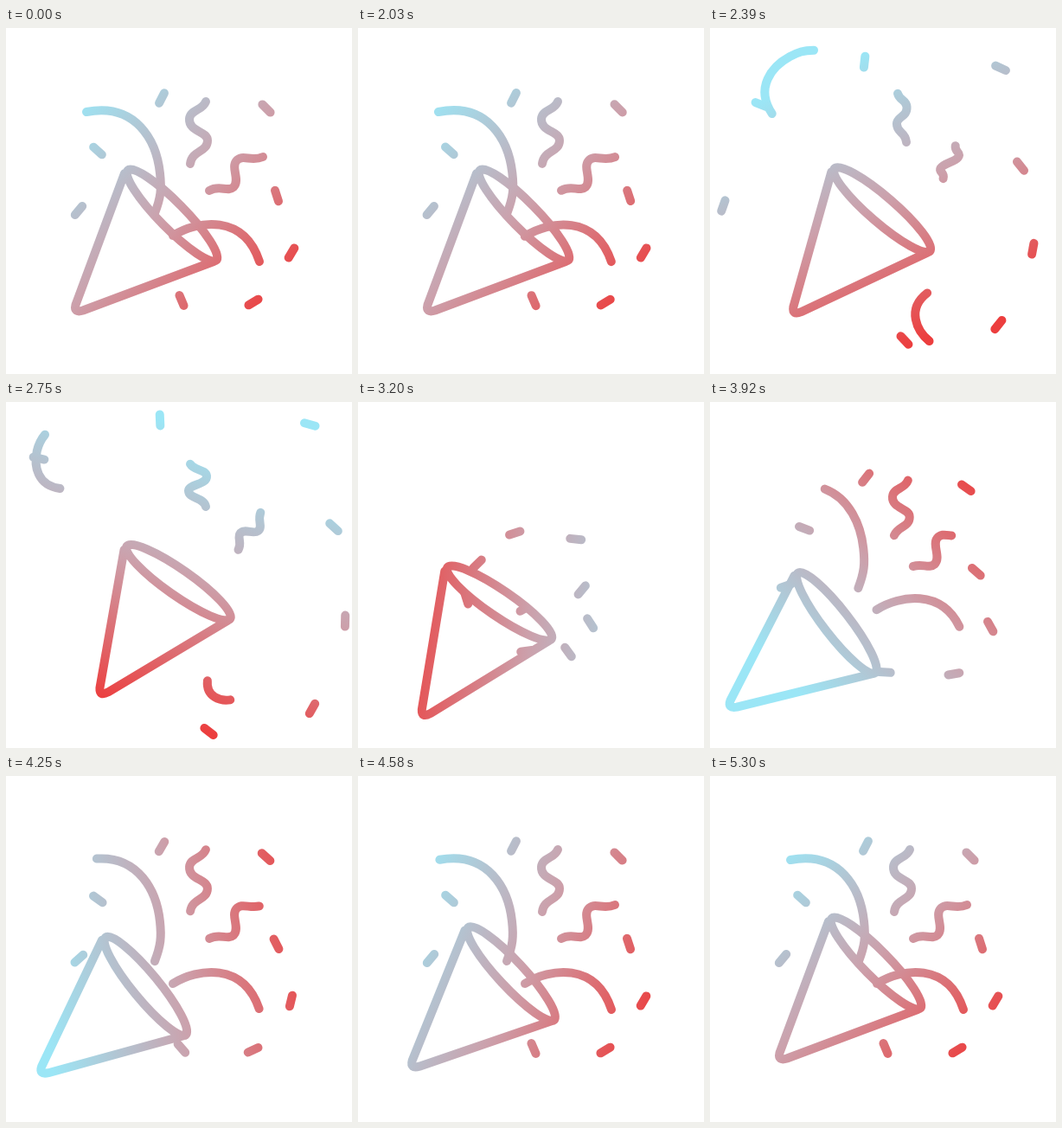
Write an HTML page with a canvas that moves like this. It is 400 px wide and 400 px high and loops after 5360 ms.

```html
<!DOCTYPE html>
<html lang="en">
<head>
<meta charset="utf-8">
<title>Party popper</title>
<style>
  html, body { margin: 0; width: 100%; height: 100%; overflow: hidden; background: #fff; }
  canvas { display: block; width: 400px; height: 400px; }
</style>
</head>
<body>
<canvas id="stage" width="400" height="400"></canvas>
<script>
const ctx = document.getElementById('stage').getContext('2d');
const LOOP = 5360, START = 2030, FIRE = 2770, GONE = 3120, SETTLE = 4527;
const MUZZLE = { x: 183, y: 250 };

// Key poses: time, then values
const conePose = [ // apex x, apex y, rotation
  [START, 83, 326, 0], [2750, 112, 336, -10.4], [3440, 55, 370, -8.7],
  [3900, 25, 352, 6.6], [4580, 65, 335, 1.6], [5300, 83, 326, 0]
];
const gradientAngle = [[START, 45], [2750, 107], [3440, 227], [3920, 315], [4580, 384], [4730, 405]];

// Resting place and tilt, turn left when fired, and the way out
const confetti = [
  { x: 180, y: 81, tilt: 117, spin: 31, dx: -2, dy: -61 },
  { x: 106, y: 142, tilt: 42, spin: -60, dx: -69, dy: -78 },
  { x: 84, y: 211, tilt: 130, spin: 85, dx: -100, dy: -8 },
  { x: 301, y: 93, tilt: 45, spin: -27, dx: 51, dy: -68 },
  { x: 313, y: 194, tilt: 72, spin: -85, dx: 67, dy: -50 },
  { x: 330, y: 260, tilt: 121, spin: -169, dx: 63, dy: -7 },
  { x: 286, y: 317, tilt: 149, spin: 59, dx: 69, dy: 38 },
  { x: 203, y: 315, tilt: 67, spin: -177, dx: 32, dy: 67 }
];

function curve(d) {
  const el = document.createElementNS('http://www.w3.org/2000/svg', 'path');
  el.setAttribute('d', d);
  return { path: new Path2D(d), length: el.getTotalLength() };
}
const leftStreamer = curve('M172 214C179 196 180 186 178 168C174 130 150 86 93 97');
const rightStreamer = curve('M193 240C222 222 275 215 293 270');
const tallSquiggle = curve('M213 157C215 141 233 144 233 130C233 119 211 120 212 105C213 94 227 96 231 85');
const wideSquiggle = curve('M235 188C247 181 256 190 263 184C271 176 260 162 266 154C273 145 283 155 297 149');

const cone = new Path2D('M137 168L80.500 320Q78 330 89 326.500L240 270');
cone.ellipse(192, 216.500, 73, 15, Math.PI * .2525, 0, Math.PI * 2);

const bit = new Path2D('M-6.500 0H6.500');

const clamp = v => Math.min(1, Math.max(0, v));
const mix = (a, b, k) => a + (b - a) * k;
const easeOut = (t, start, duration, power) => 1 - (1 - clamp((t - start) / duration)) ** power;

// Smooth curve through keys, at rest at both ends.
function track(keys, t) {
  const last = keys.length - 1;
  if (t <= keys[0][0]) return keys[0].slice(1);
  if (t >= keys[last][0]) return keys[last].slice(1);
  const i = keys.findIndex(k => k[0] > t) - 1;
  const a = keys[i], b = keys[i + 1], span = b[0] - a[0], u = (t - a[0]) / span;
  const slope = (n, c) => n === 0 || n === last ? 0 :
    (keys[n + 1][c] - keys[n - 1][c]) / (keys[n + 1][0] - keys[n - 1][0]);
  return a.slice(1).map((v, j) => {
    const c = j + 1, e = u * u * (3 - 2 * u);
    return mix(v, b[c], e) +
      span * u * (1 - u) * ((1 - u) * slope(i, c) - u * slope(i + 1, c));
  });
}

// Strokes a path with its anchor moved by (dx, dy); the line weight stays constant.
function stroke(path, ax, ay, dx, dy, turn = 0, sx = 1, sy = sx) {
  const moved = new Path2D();
  moved.addPath(path, new DOMMatrix().translate(ax + dx, ay + dy)
    .rotate(turn).scale(sx, sy).translate(-ax, -ay));
  ctx.stroke(moved);
}

function strokePart(shape, from, to, ax, ay, dx, dy, scale = 1) {
  if (to <= from) return;
  const length = shape.length * scale;
  if (from > 0 || to < 1) {
    ctx.setLineDash([(to - from) * length, 9999]);
    ctx.lineDashOffset = -from * length;
  }
  stroke(shape.path, ax, ay, dx, dy, 0, scale);
  ctx.setLineDash([]);
}

// Everything drifts away from its resting place and shrinks to nothing.
function drawExit(t) {
  const q = easeOut(t, START, 820, 2), size = clamp((GONE - t) / 150);
  const flip = Math.cos(Math.PI * q), squash = mix(1, .68, q) * size;
  for (const c of confetti) {
    stroke(bit, 0, 0, c.x + c.dx * q, c.y + c.dy * q, c.tilt - 30 * q, size);
  }
  stroke(leftStreamer.path, 93, 97, -31 * q, 3 * q, -164 * q, mix(1, .45, q) * size);
  stroke(rightStreamer.path, 293, 270, -61 * q, 53 * q, -159 * q, mix(1, .32, q) * size);
  stroke(tallSquiggle.path, 222, 121, 0, -25 * q, 0, flip * size, squash);
  stroke(wideSquiggle.path, 266, 168, 16 * q, -19 * q, 90 * q, flip * squash, squash);
}

// Everything flies from the muzzle to its resting place.
function drawBurst(t) {
  const far = Math.max(0, (SETTLE - t) / 1087) ** 3, drift = far ** 1.5;
  const spinLeft = Math.max(0, (4633 - t) / 1193) ** 2;
  const size = clamp((t - FIRE) / 120);
  for (const c of confetti) {
    stroke(bit, 0, 0, mix(c.x, MUZZLE.x, .23 * far), mix(c.y, MUZZLE.y, .23 * far),
      c.tilt + c.spin * spinLeft, size);
  }
  strokePart(leftStreamer, 0, easeOut(t, 3310, 1600, 3), 172, 214, -4 * far, 7 * far);
  strokePart(rightStreamer, 0, easeOut(t, 3180, 1350, 3), 193, 240, -3 * far, far);
  if (far < 1.7) {
    strokePart(tallSquiggle, .25 * far, 1, 231, 85, -30 * drift, 78 * drift, 1 - .35 * far);
    strokePart(wideSquiggle, .22 * far, 1 - .38 * Math.sqrt(far), 265, 160, -48 * drift, 50 * drift);
  }
}

function setGradient(t) {
  const a = track(gradientAngle, t)[0] * Math.PI / 180;
  const dx = 165 * Math.cos(a), dy = 165 * Math.sin(a);
  const g = ctx.createLinearGradient(200 - dx, 200 - dy, 200 + dx, 200 + dy);
  g.addColorStop(0, 'rgb(155,230,246)');
  g.addColorStop(.5, 'rgb(204,160,171)');
  g.addColorStop(1, 'rgb(236,62,62)');
  ctx.strokeStyle = g;
}

function draw(t) {
  ctx.clearRect(0, 0, 400, 400);
  ctx.lineWidth = 10;
  ctx.lineCap = ctx.lineJoin = 'round';
  setGradient(t);
  const [x, y, turn] = track(conePose, t);
  stroke(cone, 83, 326, x - 83, y - 326, turn);
  if (t < GONE) drawExit(t);
  if (t > FIRE) drawBurst(t);
}

const begin = performance.now();
function tick() {
  draw((performance.now() - begin) % LOOP);
  requestAnimationFrame(tick);
}
tick();
</script>
</body>
</html>
```
